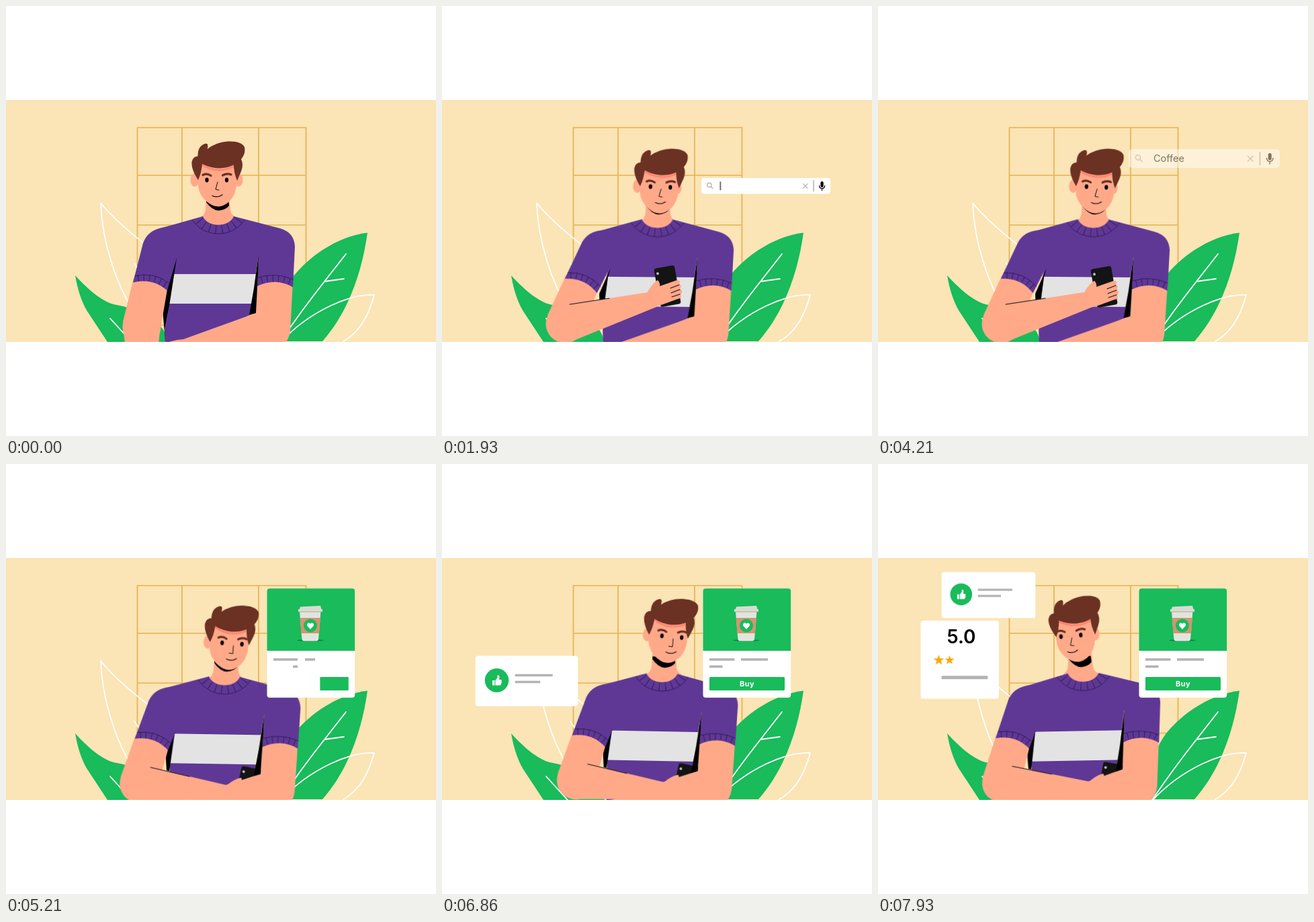
Recreate the animation shown at these times as an HTML page. Size 640x640 px, loop 8 s.

```html
<!DOCTYPE html>
<html lang="en">
<head>
<meta charset="utf-8">
<title>Coffee search</title>
<style>
html, body { margin: 0; width: 100%; height: 100%; overflow: hidden; background: #fff; }
svg { display: block; width: 100vw; height: 100vh; }
text { font-family: Inter, "Open Sans", sans-serif; }
.skin { fill: #ffa989; }
.shirt { fill: #5f3896; }
.green { fill: #19bb5b; }
.grey { fill: #b3b3b3; }
.ink { fill: none; stroke: #111; stroke-linecap: round; stroke-linejoin: round; }
.rib { fill: none; stroke: #2f1a54; stroke-width: .9; }
.vein { fill: none; stroke: #fff; stroke-width: 1.8; stroke-linecap: round; }
.brow { fill: none; stroke: #6b3123; stroke-width: 3.2; stroke-linecap: round; }
[data-a] { animation: 8s cubic-bezier(.65, 0, .35, 1) infinite; }
[data-a=caret], [data-a=blink] { animation-timing-function: step-end; }
</style>
</head>
<body>
<svg viewBox="0 0 640 640">
<defs>
  <clipPath id="band"><path d="M0 140H640V500H0Z"/></clipPath>
  <path id="star" d="M0-8.3L2-2.6 7.9-2.6 3.2 1 4.9 6.7 0 3.3-4.9 6.7-3.2 1-7.9-2.6-2-2.6Z" fill="#f4a90a"/>
</defs>
<g clip-path="url(#band)">
  <path d="M0 140H640V500H0Z" fill="#fbe4b5"/>
  <path d="M195.500 181H446.500V475H195.500ZM262 181V475M376 181V475M195 252H447M195 326H447M195 400.500H447" fill="none" stroke="#e3b452" stroke-width="1.700"/>

  <path class="green" d="M538 337.500C498 342 455 368 428 402C412 425 400 455 396 499H471C510 455 530 395 538 337.500Z"/>
  <path class="vein" d="M506 369L474 410Q440 453 408 500M474 410L503 406M548 430C515 428 455 451 408 501M548 430Q534 482 502 499"/>
  <path class="vein" d="M141 293C143 350 163 412 190 455M141 293C158 315 183 336 210 357Q222 368 228 390M191 383L215 420"/>
  <path class="green" d="M103 401C125 425 146 442 165 445C205 452 235 470 242 500H151L124 459C114 445 107 425 103 401Z"/>
  <path class="vein" d="M155 465L187 500"/>

  <g data-a="body">
    <path class="shirt" d="M255 330L246 372 241 400 237 441 236 480 237 506H262L363 460 376 369V330Z"/>
    <path fill="#e3e3e3" d="M243 399H372L366 443H237Z"/>
    <path data-a="gap"/>
    <g data-a="arm">
      <path class="skin" d="M190 405L174 470L230 480L240 422V405Z"/>
      <circle class="skin" cx="202" cy="477.500" r="28.500"/>
      <path class="shirt" d="M258 324L228 331Q210 336 204 353L189 411.500Q218 404 240 423.500L255 372Z"/>
      <path class="rib" d="M191.500 402Q220 395 243.500 413"/>
      <path class="rib" d="M190.500 406.500Q219 399 242 418" stroke-dasharray=".9 7.500" stroke-dashoffset="-6" style="stroke-width:10"/>
      <g data-a="fore">
        <path class="skin" d="M2-28L7-29L124-47L140-46L136-25L5 28Z"/>
        <path class="ink" data-a="crease" d="M7-29L66-38" stroke-width="1.200"/>
        <g data-a="hand">
          <g transform="translate(152.500 -56) rotate(-10)">
            <rect x="-15.500" y="-29" width="31" height="58" rx="3.500" fill="#141414"/>
            <circle cx="-11" cy="-21" r="2" fill="#bbb"/>
          </g>
          <path class="skin" d="M122-46C128-57 133-62 138-65Q142-61 141-56L167-65Q173-65 170-59Q175-57 171-52Q177-49 172-44Q175-38 168-37L146-29Q135-25 124-25Z"/>
          <path class="ink" d="M157-53L170-58M158-46L171-51M159-40L171-44" stroke-width="1.100"/>
        </g>
      </g>
    </g>
    <path class="skin" data-a="cross"/>
    <g data-a="neck">
      <path class="skin" d="M298 282L297 302Q296 311 290 314V335H342V314Q335 311 334 304L332 282Z"/>
      <path d="M298 288L298 292Q307 304.500 317 304.500Q328 303 332 297L331 288Z"/>
    </g>
    <path class="shirt" d="M226 332L293 313C300 330 332 330 339 313L408 331Q429 337 430 358L427 418.500Q402 404 374 417L376 369L255 376Z"/>
    <path class="rib" d="M277 318C295 346 337 346 355 318M375 404Q402 396 427.500 407"/>
    <path class="rib" d="M285 315.500C297.500 338 334.500 338 347 315.500" stroke-dasharray=".9 8.400" stroke-dashoffset="-5" style="stroke-width:12.500"/>
    <path class="rib" d="M374.500 410Q402 400 427 412" stroke-dasharray=".9 7.500" stroke-dashoffset="-6" style="stroke-width:10"/>
    <path d="M376 369L375 400 372 457 362 460 369 420Z"/>
  </g>

  <g data-a="head">
    <ellipse class="skin" data-a="earL" cx="281" cy="259" rx="6.500" ry="10"/>
    <ellipse class="skin" data-a="earR" cx="346" cy="259" rx="6.500" ry="10"/>
    <path class="skin" d="M286 230V268C288 285 303 298.500 317 298.500C330 297 342 284 343 266V230Z"/>
    <path d="M291 236Q316 251 340 238" fill="none" stroke="#ff8572" stroke-width="3"/>
    <path fill="#6b3123" d="M286 259C279 248 276 240 276.500 232Q278 224 285.500 223.500Q285 212 292 207Q298 203 300 206Q301 210 299.500 213Q312 203 330 201.500Q350 200.500 355 210Q357 220 350 228Q354 236 350 246L344 260Q339 248 339 236.500Q316 247 292 235Q291 248 286 259Z"/>
    <g data-a="face">
      <path class="brow" d="M293 251.500Q299 248.500 305 252.500M322.500 252Q329 248.500 335 251"/>
      <ellipse cx="299" cy="259" rx="2.600" ry="3.400"/>
      <ellipse cx="328.500" cy="259" rx="2.600" ry="3.400"/>
      <path class="ink" data-a="nose" stroke-width="1"/>
      <path class="ink" d="M307 282.500Q315 286 322 281" stroke-width="1.300"/>
    </g>
  </g>

  <g data-a="fade"><g data-a="search"><g transform="translate(-485.500 -247)">
    <rect x="373" y="233" width="225" height="28" rx="5" fill="#fff"/>
    <g fill="none" stroke="#aaa" stroke-width="1.400">
      <circle cx="387" cy="245.500" r="3.700"/>
      <path d="M389.700 248.200L393.500 252M550 243L558.500 251.500M558.500 243L550 251.500"/>
    </g>
    <path d="M568.500 237V257" stroke="#777"/>
    <rect x="580.700" y="239" width="5" height="10.500" rx="2.500"/>
    <path class="ink" d="M578.500 246.500Q579 251.500 583.200 251.500Q587.500 251.500 588 246.500M583.200 252V255" stroke-width="1.500"/>
    <text id="word" x="410" y="252" font-size="14.500">Coffee</text>
    <g data-a="caret">
      <rect x="410" y="238" width="60" height="19" fill="#fff"/>
      <path data-a="blink" d="M410.300 239.500V254.500" stroke="#000" stroke-width="1.300"/>
    </g>
  </g></g></g>

  <g data-a="product"><g transform="translate(-454 -266.500)">
    <rect x="388.500" y="185.300" width="130.700" height="162.500" rx="4" fill="#fff"/>
    <path class="green" d="M388.500 278V189.300Q388.500 185.300 392.500 185.300H515.200Q519.200 185.300 519.200 189.300V278Z"/>
    <ellipse cx="453" cy="262.500" rx="20" ry="1.300" fill="#0d8740"/>
    <path fill="#e3e5dc" d="M437 219H468.500L465 261Q464.500 263.500 461 263.500H444Q441 263.500 440.500 261Z"/>
    <path fill="#cf9673" d="M437.500 229H468L466 252H439.500Z"/>
    <path fill="#d9dbd1" d="M437 216L438 212.500L468 211L469.500 216H471V220H435V216Z"/>
    <path d="M435.500 220H470.500" stroke="#a9aba2"/>
    <circle class="green" cx="453" cy="240.500" r="10"/>
    <path fill="#fff" d="M453 246L448.800 241.500C446 238 450.500 234.500 453 238C455.500 234.500 460 238 457.200 241.500Z"/>
    <rect class="grey" data-a="title" x="398" y="289.200" width="37.500" height="3.600"/>
    <rect class="grey" data-a="price" x="445" y="289.200" width="40" height="3.600"/>
    <rect class="grey" data-a="note" x="398" y="299.700" width="19.500" height="3.600"/>
    <rect class="green" data-a="button" x="398" y="317" width="112" height="20" rx="1.500"/>
    <text data-a="buy" x="454" y="330.500" font-size="11" font-weight="700" letter-spacing=".5" text-anchor="middle" fill="#fff">Buy</text>
  </g></g>

  <g data-a="rating">
    <rect x="-58.500" y="-58" width="116.500" height="116.500" rx="4" fill="#fff"/>
    <text data-a="score" x="2" y="-24" font-size="28" font-weight="600" text-anchor="middle">5.0</text>
    <g transform="translate(-31.500 1)"><use href="#star" data-a="star1"/></g>
    <g transform="translate(-15.500 1)"><use href="#star" data-a="star2"/></g>
    <rect class="grey" data-a="review" x="-27.500" y="24.200" width="69" height="5" rx="1.500"/>
  </g>

  <g data-a="liked">
    <rect x="-76.300" y="-37.500" width="152.600" height="75" rx="4" fill="#fff"/>
    <circle class="green" cx="-44.500" cy="-1" r="17.800"/>
    <path fill="#fff" d="M-51-1H-47.500V6.500H-51ZM-46.500-1L-43.500-5V-8.500Q-41-9.500-40.500-6L-41-2H-38Q-36.500-1.500-37.500 1Q-36.500 3-38 4Q-38 6.500-40 6.500H-46.500Z"/>
    <rect class="grey" data-a="like1" x="-17.300" y="-10.300" width="56" height="3.500"/>
    <rect class="grey" data-a="like2" x="-17.300" y="-.300" width="37.500" height="3.500"/>
  </g>
</g>
</svg>
<script>
const LOOP = 8000;
const sheet = document.head.appendChild(document.createElement('style'));
const at = (x, y, s = 1) => `transform:translate(${x}px,${y}px) scale(${s})`;

// frames: [ms, declarations]; the first and last are held to the ends of the loop.
function animate(name, frames, origin = '0 0') {
  const all = [[0, frames[0][1]], ...frames, [LOOP, frames.at(-1)[1]]];
  const keys = all.map(([ms, css]) => `${ms / LOOP * 100}%{${css}}`).join('');
  sheet.append(`@keyframes ${name}{${keys}}[data-a=${name}]{animation-name:${name};transform-origin:${origin}}`);
}
const reveal = (name, start, end, from, to, origin) =>
  animate(name, [[start, from], [end, to]], origin);
const grow = (name, start, end, x) =>
  reveal(name, start, end, 'transform:scaleX(0)', 'transform:scaleX(1)', `${x}px 0`);

// Character: each pose is a lean, a drop and an arm position, held from start to end.
const arms = {
  down: { upper: 0, fore: 105 },
  phone: { upper: 10.5, fore: -.5 },
  crossed: { upper: 5, fore: 21 },
};
const poses = [
  { start: 0, end: 1210, lean: 0, drop: 0, hold: 'down' },
  { start: 1935, end: 4500, lean: 2, drop: 4.5, hold: 'phone' },
  { start: 5210, end: 5300, lean: 4, drop: 3.5, hold: 'crossed' },
  { start: 6160, end: 7140, lean: 5, drop: -1, hold: 'crossed' },
  { start: 7840, end: LOOP, lean: -4.7, drop: -1.7, hold: 'crossed' },
];
const part = (name, style, origin) => animate(name,
  poses.flatMap(p => [[p.start, style(p)], [p.end, style(p)]]), origin);
const follow = (name, x, y, turn, origin) => part(name, ({ lean, drop }) =>
  `${at(x * lean, y * drop)} rotate(${turn * lean}deg)`, origin);
const shape = (name, pick) => part(name, p => `d:path("M${pick(p)}Z")`);

follow('body', 2.2, 1, .22, '316px 330px');
follow('neck', .7, .3, 0);
follow('head', 4.4, 2.3, 1, '316px 260px');
follow('face', 1.25, 0, 0);
const ear = lean => Math.max(.45 * lean, -2.3 * lean);
part('earL', p => at(ear(p.lean), 0));
part('earR', p => at(-ear(-p.lean), 0));
part('arm', p => `transform:rotate(${arms[p.hold].upper}deg)`, '233.5px 352.5px');
part('fore', p => `${at(202, 477.5)} rotate(${arms[p.hold].fore - arms[p.hold].upper}deg)`);
shape('gap', p => p.hold === 'down'
  ? '255 369L238 425L233 452L237 498L236 480L244 440'
  : '247 386L230 425L232 454L236 455L238 441L243 400');
shape('cross', p => '374 410L427 410L423 484Q421 498 411 506L230 506' +
  (p.hold === 'crossed' ? 'Q250 502 322 474L372 457' : 'Q245 497 264 496L372 457'));
part('nose', p => `d:path("M${p.lean > 3 ? '316 262L316 274L310.5 273.5' : '315 262L312 273L317 274'}")`);
reveal('crease', 1350, 1500, 'opacity:0', 'opacity:1');
animate('hand', [[2290, at(0, 0)], [3200, at(2, 2)], [4210, at(1, 1)], [5210, at(0, 0)]]);

// Search bar and typing
animate('search', [[1497, at(462, 390, 0)], [2145, at(485.5, 247)],
  [3860, at(485.5, 247)], [4200, at(485.5, 227)]]);
reveal('fade', 4000, 4420, 'opacity:1', 'opacity:0');
const word = document.getElementById('word');
const typed = [...word.textContent].map((_, i) =>
  [2350 + 220 * i, at(word.getSubStringLength(0, i + 1), 0)]);
animate('caret', [[2349, at(-4, 0)], ...typed]);
reveal('blink', 3559, 3560, 'opacity:1', 'opacity:0');

// Product card
reveal('product', 4560, 5160, at(454, 330, 0), at(454, 266.5));
grow('title', 4850, 5300, 398);
grow('price', 5010, 5450, 445);
grow('button', 5010, 5450, 510);
reveal('note', 5010, 5450, 'transform:translateX(47px) scaleX(0)', 'transform:translateX(0) scaleX(1)', '398px 0');
reveal('buy', 5440, 5720, 'opacity:0', 'opacity:1');

// Reaction and rating cards
const spot = s => at(126, 323, s);
animate('liked', [[5800, spot(0)], [6340, spot(1.07)], [6800, spot(1)],
  [6920, spot(1)], [7140, spot(1.05)], [7720, at(164.5, 195, .915)]]);
grow('like1', 6160, 6600, -17);
grow('like2', 6320, 6760, -17);
reveal('rating', 7280, 7720, at(122, 291, 0), at(122, 291));
reveal('score', 7520, 7800, 'transform:scale(0)', 'transform:scale(1)', '2px -35px');
reveal('star1', 7640, 7880, at(0, 0, 0), at(0, 0));
reveal('star2', 7760, 8000, at(0, 0, 0), at(0, 0));
grow('review', 7560, 7880, -27);
</script>
</body>
</html>
```
